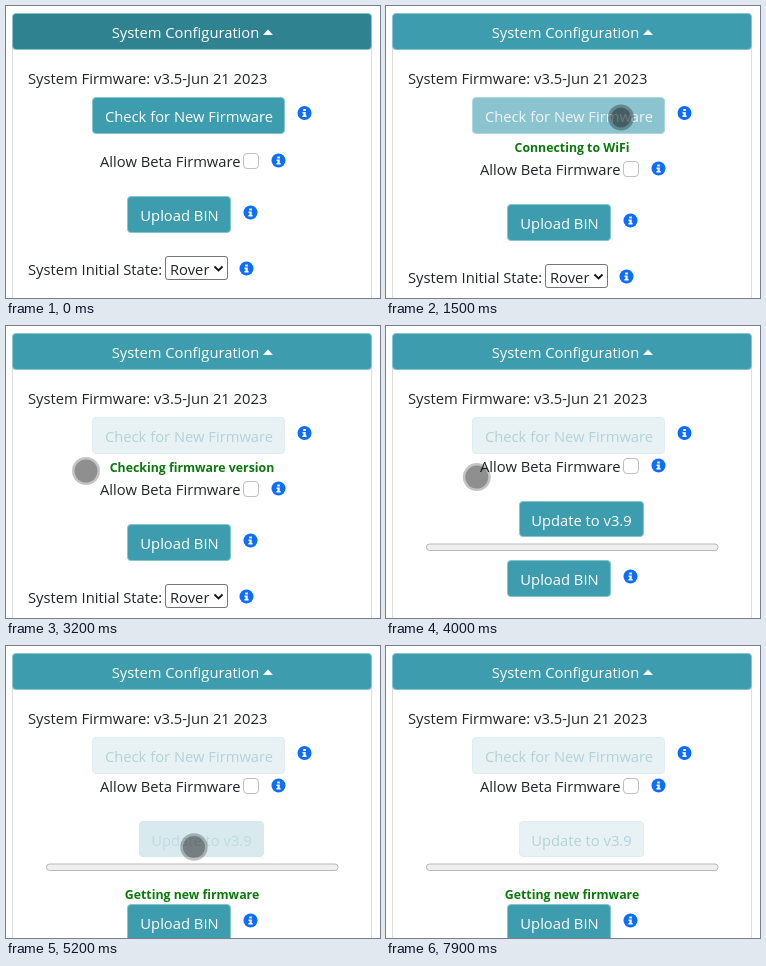
An HTML page that plays this animation: 374 by 292 pixels, repeating every 8000 ms.

```html
<!DOCTYPE html>
<html lang="en">
<head>
<meta charset="utf-8">
<title>System Configuration</title>
<style>
  html, body { margin: 0; width: 100%; height: 100%; overflow: hidden; background: #fff; }
  svg { display: block; width: 374px; height: 292px; font: 14.75px "Open Sans", "Noto Sans", sans-serif; fill: #212529; }
  .mid { text-anchor: middle; }
  .white { fill: #fff; }
  .btn rect { fill: #3d9dae; stroke: #84c5d0; }
  .btn text { fill: #fff; text-anchor: middle; }
  .box { fill: #fff; stroke: #bfbfbf; }
  #header { stroke: #84c5d0; }
  #note { font-size: 12.3px; font-weight: 700; fill: #0a780a; }
</style>
</head>
<body>
<svg viewBox="0 0 374 292">
  <defs>
    <g id="info">
      <circle r="7" fill="#0d6efd"/>
      <path d="M-1.3-4h2.6v2.1h-2.6zM-2-.9H1.2V2.6H2.1V4.1H-2.1V2.6H-1.1V.6H-2z" fill="#fff"/>
    </g>
  </defs>
  <path d="M6.5 40V292M365.5 40V292" stroke="#dfdfdf"/>
  <rect id="header" x="6.5" y="7.5" width="359" height="36" rx="3.5"/>
  <text class="mid white" x="179.5" y="32">System Configuration</text>
  <path class="white" d="M257 29L262 23.5L267 29z"/>

  <text x="22" y="78">System Firmware: v3.5-Jun 21 2023</text>
  <g class="btn" id="check">
    <rect x="86.5" y="91.5" width="192" height="36" rx="3.5"/>
    <text x="183" y="116">Check for New Firmware</text>
  </g>
  <use href="#info" x="298.5" y="107"/>
  <text class="mid" id="note" x="186"></text>

  <g id="beta">
    <text x="94" y="161">Allow Beta Firmware</text>
    <rect class="box" x="237.5" y="147.5" width="15" height="15" rx="3.5"/>
    <use href="#info" x="272.5" y="154.5"/>
  </g>

  <g id="offer">
    <g class="btn" id="update">
      <rect x="133.5" y="175.5" width="124" height="35" rx="3.5"/>
      <text x="195.5" y="200">Update to v3.9</text>
    </g>
    <rect x="40.5" y="218" width="291.5" height="6.5" rx="3" fill="#efefef" stroke="#b8b8b8"/>
  </g>

  <g id="lower">
    <g class="btn">
      <rect x="121.5" y="190.5" width="103" height="36" rx="3.5"/>
      <text x="173.5" y="215">Upload BIN</text>
    </g>
    <use href="#info" x="244.5" y="206.5"/>
    <text x="22" y="269">System Initial State:</text>
    <rect x="159.5" y="250.5" width="62" height="23" rx="2.5" fill="#fff" stroke="#767676"/>
    <text x="164" y="268.5">Rover</text>
    <path d="M208.5 260.5l4 4 4-4" fill="none" stroke="#111" stroke-width="1.8"/>
    <use href="#info" x="240.5" y="262.5"/>
  </g>

  <g id="cursor" fill="#000">
    <circle id="halo"/>
    <circle id="core"/>
  </g>
</svg>
<script>
const LOOP = 8000, STEP = 100, FADE = 220;
const CLICK = 1400, CHECKING = 2600, FOUND = 3900, UPDATE = 5000, HIDE = 5900;
const el = id => document.getElementById(id);
const clamp = v => Math.max(0, Math.min(1, v));
const mix = (a, b, k) => a + (b - a) * k;
const rgb = (a, b, k) => `rgb(${a.map((v, i) => Math.round(mix(v, b[i], k)))})`;
const shift = (id, y) => el(id).setAttribute('transform', `translate(0 ${y})`);

const TEAL = [61, 157, 174], DARK = [47, 131, 144], PALE = [232, 242, 244];
const EDGE = [132, 197, 208], PALE_EDGE = [222, 237, 240];
const WHITE = [255, 255, 255], FADED = [178, 210, 217];

// time, x, y, pressure
const path = [
  [300, 258, 62, 0], [700, 235, 111.5, 0], [1000, 235, 111.5, 1], [1600, 235, 111.5, 1],
  [1800, 235, 111.5, 0], [2500, 80, 145, 0], [3900, 80, 145, 0], [4400, 184, 203, 0],
  [4600, 184, 203, 1], [4900, 184, 203, 1], [5200, 188, 201, .3], [5400, 188, 201, 0]
];

function pointer(t) {
  const i = path.findIndex(p => p[0] > t);
  if (i < 0) return path[path.length - 1];
  if (i === 0) return path[0];
  const a = path[i - 1], b = path[i], k = (t - a[0]) / (b[0] - a[0]);
  const ease = k * k * (3 - 2 * k);
  return a.map((v, n) => mix(v, b[n], ease));
}

function disable(id, k) {
  const [rect, text] = el(id).children;
  rect.style.fill = rgb(TEAL, PALE, k);
  rect.style.stroke = rgb(EDGE, PALE_EDGE, k);
  text.style.fill = rgb(WHITE, FADED, k * k);
}

function circle(id, r, alpha) {
  el(id).setAttribute('r', r);
  el(id).setAttribute('fill-opacity', alpha);
}

function draw(t) {
  el('header').style.fill = rgb(DARK, TEAL, clamp((t - CLICK + 100) / 150));
  disable('check', clamp((t - CLICK) / FADE));
  disable('update', clamp((t - UPDATE) / FADE));

  const found = t >= FOUND, updating = t >= UPDATE;
  el('note').textContent = updating ? 'Getting new firmware' : found || t < CLICK ? ''
    : t < CHECKING ? 'Connecting to WiFi' : 'Checking firmware version';
  el('note').setAttribute('y', updating ? 253 : 146);
  el('offer').style.display = found ? '' : 'none';
  shift('beta', found ? -15 : t < CLICK ? 0 : 8);
  shift('lower', updating ? 68 : found ? 44 : t < CLICK ? 0 : 8);

  const [, x, y, press] = pointer(t);
  el('cursor').style.display = t >= path[0][0] && t < HIDE ? '' : 'none';
  el('cursor').setAttribute('transform', `translate(${x} ${y})`);
  circle('halo', mix(14, 13, press), mix(.23, .3, press));
  circle('core', mix(11.5, 10, press), mix(.27, .3, press));
}

function tick() {
  const t = performance.now() % LOOP;
  draw(Math.floor(t / STEP) * STEP);
  requestAnimationFrame(tick);
}
tick();
</script>
</body>
</html>
```
